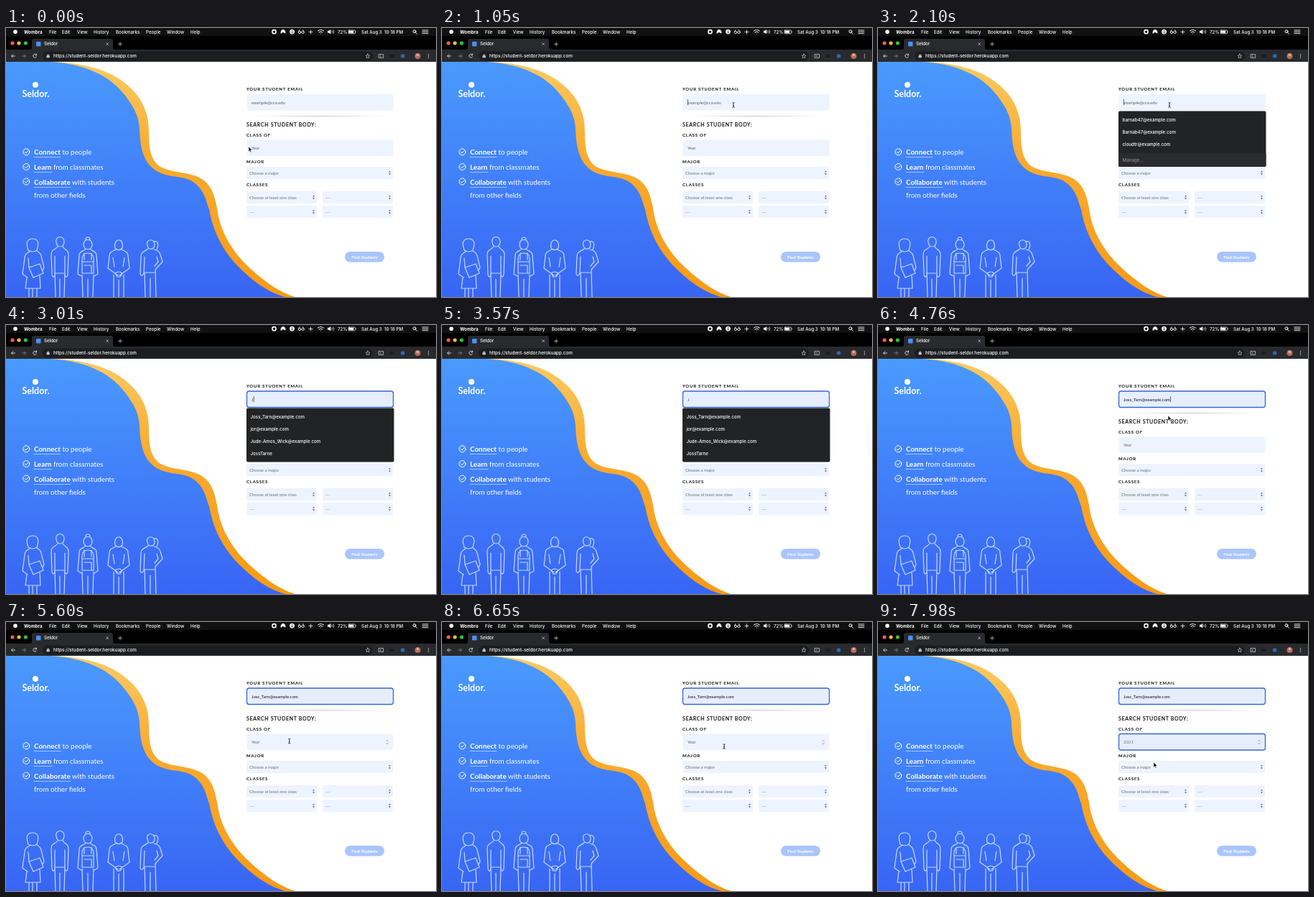
An HTML page that plays this animation: 599 px wide and 374 px high, repeating every 8000 ms.

```html
<!DOCTYPE html>
<html lang="en">
<head>
<meta charset="utf-8">
<title>Seldor</title>
<style>
html, body { margin: 0; width: 100%; height: 100%; overflow: hidden; background: #fff; }
svg { display: block; width: 599px; height: 374px; }
text { white-space: pre; }
.ui { font: 500 6.2px Inter, sans-serif; fill: #fff; }
.page { font: 6px Lato, sans-serif; fill: #6c6c6c; }
.label { font: 500 6px Lato, sans-serif; letter-spacing: .8px; fill: #111; stroke: #111; stroke-width: .16px; }
.label .big { font-size: 7px; letter-spacing: .7px; }
.points { font: 9.9px Lato, sans-serif; fill: #fff; }
.points .logo { font-size: 12.5px; }
.b { font-weight: 700; }
.url { font-size: 6.35px; }
.line { fill: none; stroke: #fff; stroke-width: 1; stroke-linecap: round; stroke-linejoin: round; }
.people { stroke: #c3d8ff; stroke-width: 1.2; }
.grey { stroke: #c4c7cb; }
</style>
</head>
<body>
<svg viewBox="0 0 599 374">
  <defs>
    <linearGradient id="blue" x2="0" y2="1"><stop stop-color="#4a9afe"/><stop offset="1" stop-color="#3865f4"/></linearGradient>
    <linearGradient id="orange" x2="0" y2="1"><stop stop-color="#fdca62"/><stop offset=".4" stop-color="#f9ab30"/><stop offset="1" stop-color="#f99a15"/></linearGradient>
    <linearGradient id="fade"><stop stop-color="#999" stop-opacity="0"/><stop offset=".5" stop-color="#999"/><stop offset="1" stop-color="#999" stop-opacity="0"/></linearGradient>
  </defs>

  <!-- menu bar -->
  <path d="M0 0H599V11H0Z" fill="#111"/>
  <circle cx="13" cy="5.2" r="2.8" fill="#fff"/>
  <g class="ui" id="menu"></g>
  <g class="line">
    <circle cx="373.5" cy="5.2" r="2.6" stroke-width="1.6"/>
    <path d="M383 7Q383 2.500 386 2.500T389 7L386 5.500Z" fill="#fff"/>
    <circle cx="398.500" cy="5.2" r="3" fill="#fff"/>
    <path d="M398.500 5V7M398.500 3.300V3.500" stroke="#000"/>
    <circle cx="409" cy="6" r="1.7" stroke-width=".8"/><circle cx="413.500" cy="6" r="1.7" stroke-width=".8"/>
    <path d="M407.500 5L409 2.500M415 5L413.500 2.500M422 5.500H427M424.500 3V8" stroke-width=".8"/>
    <path d="M434.500 4Q438.500 1 442.500 4M436 6Q438.500 4 441 6M438.500 8V8"/>
    <path d="M448.500 4H450L452 2.500V8L450 6.500H448.500Z" fill="#fff" stroke-width=".5"/>
    <path d="M454 4Q455 5.200 454 6.500M456 3Q458 5.200 456 7.500" stroke-width=".8"/>
    <rect x="477" y="3" width="9.500" height="4.800" rx="1" stroke-width=".7"/>
    <path d="M478 4H484V6.800H478ZM487.800 4.800V6" fill="#fff" stroke-width=".5"/>
    <circle cx="569" cy="4.700" r="2"/><path d="M570.500 6.300L572.500 8.300"/>
    <path d="M580 3H588M580 5.300H588M580 7.600H588" stroke-width=".9"/>
  </g>

  <!-- browser frame -->
  <path d="M0 11H599V31H0Z"/>
  <path d="M0 30H599V47H0Z" fill="#292a2d"/>
  <path d="M33 30Q36 30 36 27V18Q36 15 39 15H146Q149 15 149 18V27Q149 30 152 30Z" fill="#292a2d"/>
  <circle cx="9" cy="21" r="2.600" fill="#fc5b57"/><circle cx="18" cy="21" r="2.600" fill="#fdbc2e"/><circle cx="27.300" cy="21" r="2.600" fill="#28c840"/>
  <rect x="42" y="19" width="6.500" height="6.500" rx="1" fill="#4a8ffb"/>
  <rect x="51" y="32.500" width="460" height="13" rx="6.500" fill="#1c1d20"/>
  <g class="ui"><text x="53" y="24.300">Seldor</text><text class="url" x="66" y="41.300">https://student-seldor.herokuapp.com</text></g>
  <g class="line grey">
    <path d="M139.800 20.800L142.600 23.600M142.600 20.800L139.800 23.600M156.500 22.300H161.500M159 19.800V24.800" stroke-width=".8"/>
    <path d="M12.500 39H7.500M9.800 36.700L7.500 39L9.800 41.300"/>
    <path d="M22.500 39H27.500M25.200 36.700L27.500 39L25.200 41.300" stroke="#77797d"/>
    <path d="M42.300 37.300A2.500 2.500 0 1 0 42.500 40M42.500 36V37.800H40.700"/>
    <path d="M57 38.700H60.500V41H57ZM57.700 38.500V37.300Q58.700 36 59.700 37.300V38.500" fill="#c4c7cb" stroke-width=".6"/>
    <path d="M504 36L504.900 38.100L507 38.200L505.400 39.700L505.900 41.800L504 40.700L502.100 41.800L502.600 39.700L501 38.200L503.100 38.100Z" stroke-width=".7"/>
    <rect x="519.500" y="36.500" width="6" height="5" stroke-width=".8"/><path d="M521 39H522.500"/>
    <path d="M588.500 36.700V36.700M588.500 39V39M588.500 41.300V41.300" stroke-width="1.400"/>
  </g>
  <rect x="534.500" y="37" width="6" height="4" rx="1" fill="#1c1d20"/>
  <circle cx="552.700" cy="39" r="2.800" fill="#286cb5"/>
  <circle cx="573.500" cy="39" r="4" fill="#b66c5c"/><circle cx="573.500" cy="37.500" r="1.700" fill="#e1b49d"/>

  <!-- side panel -->
  <path fill="url(#orange)" d="M0 47H70C112 50 142 58 165 76C188 94 199 116 199 144C199 166 201 184 215 193C232 202 258 200 273 210C289 221 291 237 294 250C297 278 312 309 341 335C362 354 382 368 403 374H0Z"/>
  <path fill="url(#blue)" d="M0 47H62C110 50 145 66 166 94C178 110 185 122 186 140C187 165 190 195 222 204C236 208 250 206 262 215C278 227 279 243 283 252C288 280 300 310 330 338C350 357 370 369 389 374H0Z"/>
  <circle cx="41" cy="79" r="4" fill="#fff"/>
  <g class="points">
    <text class="b logo" x="22.500" y="96">Seldor.</text>
    <text x="39" y="175.800"><tspan class="b">Connect</tspan> to people</text>
    <text x="39" y="196.500"><tspan class="b">Learn</tspan> from classmates</text>
    <text x="39" y="218"><tspan class="b">Collaborate</tspan> with students</text>
    <text x="39" y="236">from other fields</text>
  </g>
  <g class="line" id="ticks"><path d="M39 179.500H76M39 200.500H64M39 221.500H90" stroke-width=".7" opacity=".75"/></g>
  <g class="line people">
    <path d="M31 309C27 298 30 293 37 293S47 298 43 309Q37 313 31 309M34 310C30 313 26 314 26 320L23 342L30 347M43 310C48 313 49 315 50 321L53 333L51 337M32 333L47 328L52 341L38 347ZM31 320L32 333M29 347L27 362H48L47 344M32 362V374M37 362V374M43 362V374"/>
    <path d="M70 298C68 288 82 288 81 298C80 306 71 306 70 298M72 304C68 309 63 308 63 315L64 343C65 348 68 346 68 342V317M79 304C82 309 87 308 87 315L86 343C85 348 82 346 82 342V317M68 342L69 374M82 342L81 374M75 349V374M68 341H82"/>
    <path d="M111 294A3 3 0 1 1 117 294M108 301C108 292 120 292 120 301S108 310 108 301M111 307C108 311 102 310 102 316L100 342L105 345M117 307C120 311 126 310 126 316L128 342L123 345M106 341V321Q106 313 114 313T122 321V341ZM106 325H122M109 330H119V341M109 313V322M119 313V322M106 343L107 374M122 343L121 374M114 349V374"/>
    <path d="M152 306C149 291 165 291 162 306Q157 311 152 306M153 308C148 311 144 311 144 317L142 334L156 344M161 308C166 311 170 311 170 317L172 334L158 344M149 319L151 332M165 319L163 332M152 341Q157 337 162 341L159 346H155ZM150 343L150 374M164 343L164 374M157 350V374"/>
    <path d="M197 302C194 293 207 292 207 301C207 309 198 309 197 302M206 297C212 295 213 302 210 308M198 307C193 311 188 311 188 317L187 342Q189 347 192 341L193 318M206 308C212 309 214 311 215 315L218 325L208 336M210 318L212 325L207 331M193 340H208M193 341L194 374M208 336L209 374M201 348V374"/>
  </g>

  <!-- form -->
  <g class="label">
    <text x="335" y="86.500">YOUR STUDENT EMAIL</text>
    <text class="big" x="335" y="136.800">SEARCH STUDENT BODY:</text>
    <text x="335" y="150.500">CLASS OF</text>
    <text x="335" y="187.700">MAJOR</text>
    <text x="335" y="220">CLASSES</text>
  </g>
  <rect x="345" y="122.200" width="185" height=".6" fill="url(#fade)"/>
  <g class="page">
    <g id="selects"></g>
    <rect id="emailBox" x="335.500" y="92" width="204" height="22.500" rx="3"/>
    <rect id="yearBox" x="335.500" y="155.500" width="204" height="22.500" rx="3"/>
    <text id="email" x="342" y="105.500"></text>
    <text id="year" x="342" y="169.200"></text>
    <path id="spin" d="M529.500 166L531 164.200L532.500 166M529.500 168.200L531 170L532.500 168.200" fill="none" stroke="#888" stroke-width=".7"/>
    <rect x="472" y="311" width="55" height="14.500" rx="7.200" fill="#a9c5fc"/>
    <text x="499.500" y="320.500" text-anchor="middle" fill="#fff" stroke="#fff" stroke-width=".15">Find Students</text>
  </g>
  <rect id="caret" width=".7" height="8" fill="#222"/>
  <g id="menuBox" class="ui">
    <rect id="list" x="335" y="115.500" width="205.500" rx="2" fill="#222324"/>
    <path id="manage" d="M335 174H540.500V191Q540.500 193 538.500 193H337Q335 193 335 191Z" fill="#2a2b2e"/>
    <rect id="hover" x="335" y="119.500" width="205.500" height="17" fill="#3b3c40"/>
    <text x="340.500" y="130"></text><text x="340.500" y="146.900"></text><text x="340.500" y="163.700"></text><text x="340.500" y="180.500"></text>
    <text id="more" x="340.500" y="186" fill="#8e8f92">Manage...</text>
  </g>
  <g id="cursor">
    <path id="arrow" d="M0 0V7L1.600 5.500L2.700 8L3.800 7.500L2.700 5.100H5Z" fill="#000" stroke="#fff" stroke-width=".5"/>
    <path id="beam" d="M-1.600 -3.300Q0 -3.300 0 -2.300Q0 -3.300 1.600 -3.300M0 -2.300V2.300M-1.600 3.300Q0 3.300 0 2.300Q0 3.300 1.600 3.300M-.8 .8H.8" fill="none" stroke="#111" stroke-width=".8"/>
  </g>
</svg>
<script>
const $ = id => document.getElementById(id);
const set = (id, attrs) => { for (const k in attrs) $(id).setAttribute(k, attrs[k]); };
const show = (id, on) => set(id, { visibility: on ? 'visible' : 'hidden' });
const add = (id, markup) => $(id).insertAdjacentHTML('beforeend', markup);

[['Wombra', 25], ['File', 60], ['Edit', 78], ['View', 99], ['History', 122], ['Bookmarks', 153],
 ['People', 195], ['Window', 224], ['Help', 257], ['72%', 462], ['Sat Aug 3  10:18 PM', 495]]
  .forEach(([word, x], i) => add('menu', `<text x="${x}" y="7.500" class="${i ? '' : 'b'}">${word}</text>`));

for (const y of [172.3, 193, 213.5])
  add('ticks', `<circle cx="28.300" cy="${y}" r="4.500"/><path d="M26 ${y}l1.800 1.800l3.200 -3.500"/>`);

[['Choose a major', 335, 193, 204], ['Choose at least one class', 335, 227, 98],
 ['---', 441, 227, 98], ['---', 335, 247, 98], ['---', 441, 247, 98]]
  .forEach(([word, x, y, w]) => add('selects',
    `<rect x="${x}" y="${y}" width="${w}" height="17" rx="2" fill="#edf4ff"/>
     <text x="${x + 4}" y="${y + 10.7}">${word}</text>
     <path d="M${x + w - 6} ${y + 7.6}l1.500 -2.200l1.500 2.200zm0 1.600l1.500 2.200l1.500 -2.200z" fill="#666"/>`));

const address = 'Joss_Tarn@example.com';
const saved = ['barnab47@example.com', 'Barnab47@example.com', 'cloudtr@example.com', ''];
const matches = [address, 'jor@example.com', 'Jude-Amos_Wick@example.com', 'JossTarne'];
const rows = [...$('menuBox').querySelectorAll('text')].slice(0, 4);

// time, x, y
const path = [[70, 338, 165], [840, 406, 107], [4060, 406, 107], [4200, 405, 116], [4620, 404, 126],
  [5180, 404, 126], [5740, 393, 173], [7560, 393, 173], [7980, 384, 195]];
const caretOn = [[980, 1610], [2100, 2660], [2940, 3360], [4060, 4340], [4760, 5260], [5740, 6300], [6790, 7560]];
const within = (t, [a, b]) => t >= a && t < b;

function pointer(t) {
  const i = path.findIndex(p => p[0] > t);
  if (i < 1) return path[i ? path.length - 1 : 0].slice(1);
  const [a, x, y] = path[i - 1], [b, u, v] = path[i];
  const k = (t - a) / (b - a), e = k * k * (3 - 2 * k);
  return [x + (u - x) * e, y + (v - y) * e];
}

function box(id, valid) {
  set(id, { fill: valid ? '#e6eefe' : '#edf4ff', stroke: valid ? '#3467d6' : 'none', 'stroke-width': 1.3 });
}

function write(id, value, placeholder, color) {
  $(id).textContent = value || placeholder;
  set(id, { fill: value ? color : '#606060' });
}

function draw(now) {
  const t = Math.floor(now % 8000 / 70) * 70;
  const typed = t >= 2940, chosen = t >= 4480;
  const open = within(t, [1120, 4760]);
  const digits = [6790, 6930, 7280, 7420].filter(s => t >= s).length;

  box('emailBox', typed);
  box('yearBox', digits);
  write('email', chosen ? address : typed ? 'J' : '', 'example@cca.edu', chosen ? '#111' : '#555');
  write('year', '2021'.slice(0, digits), 'Year', '#777');

  show('list', open);
  set('list', { height: typed ? 75 : 77.5 });
  show('manage', open && !typed);
  show('more', open && !typed);
  show('hover', open && chosen);
  rows.forEach((row, i) => row.textContent = open ? (typed ? matches : saved)[i] : '');

  const field = $(t < 5530 ? 'email' : 'year');
  const filled = t < 5530 ? typed : digits;
  show('caret', caretOn.some(span => within(t, span)));
  set('caret', { x: 342 + (filled ? field.getComputedTextLength() + .3 : 0), y: t < 5530 ? 99.2 : 163 });

  const [x, y] = pointer(t);
  const inEmail = y > 92 && y < 115, inYear = y > 155 && y < 179;
  const beam = x > 341 && (inEmail || inYear);
  const visible = t < 2940 || within(t, [4060, 6790]) || t >= 7560;
  set('cursor', { transform: `translate(${x} ${y})` });
  show('beam', visible && beam);
  show('arrow', visible && !beam);
  show('spin', digits || (beam && inYear));
}

function tick() {
  draw(performance.now());
  requestAnimationFrame(tick);
}
tick();
</script>
</body>
</html>
```
